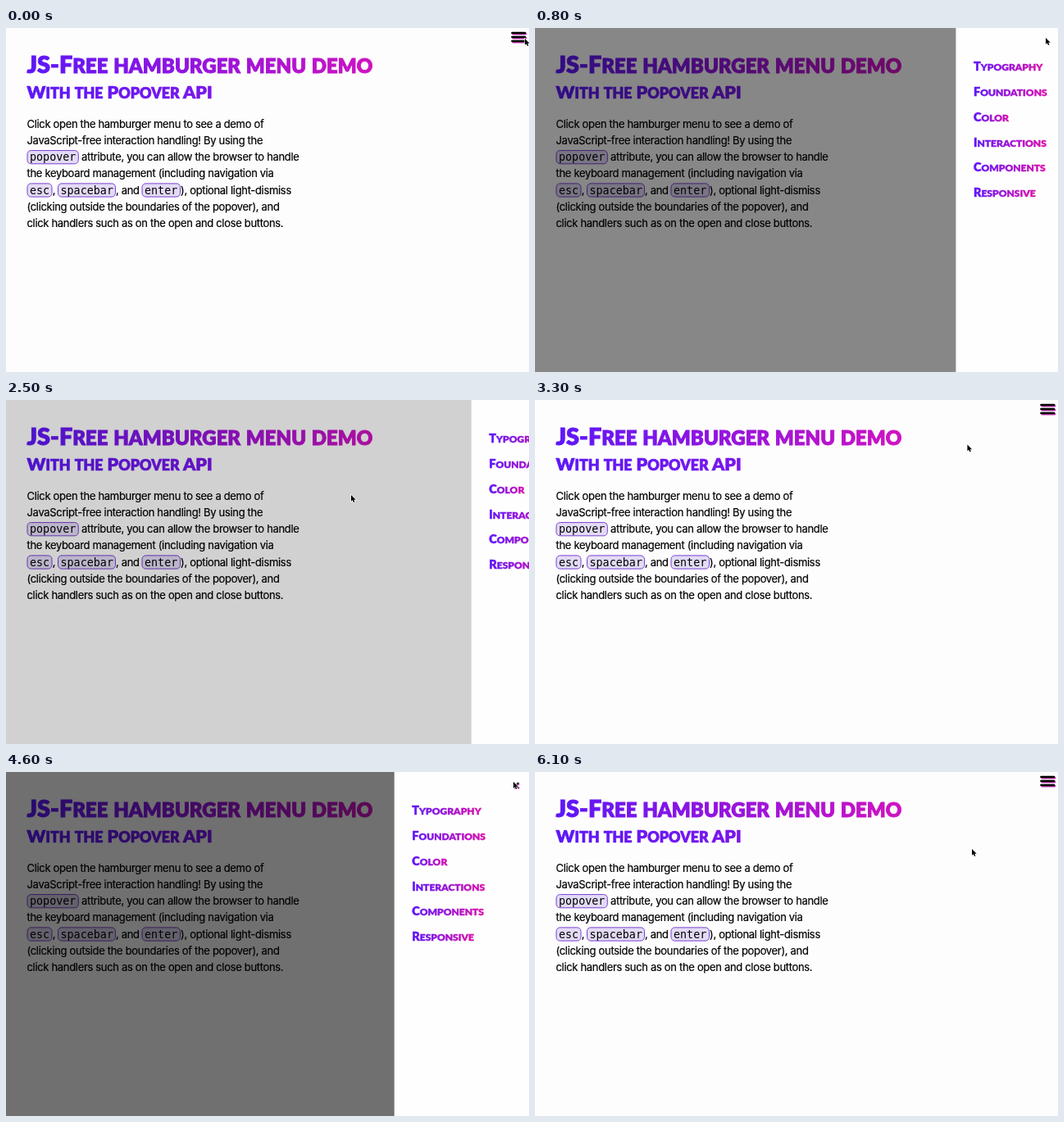
Write an HTML page that moves like this. It is 638x420 px and loops after 6600 ms.

```html
<!DOCTYPE html>
<html lang="en">
<head>
<meta charset="utf-8">
<title>Hamburger menu demo</title>
<style>
  html, body { margin: 0; width: 100%; height: 100%; overflow: hidden; background: #fdfdfd; }
  svg { display: block; width: 638px; height: 420px; }
  text { white-space: pre; }
  .caps { font-family: Lato, sans-serif; font-weight: 900; stroke-width: .03em; }
  .caps .small { font-size: .83em; }
  .body { font: 13px Inter, sans-serif; letter-spacing: -.325px; stroke: #000; stroke-width: .2px; }
  .code { font: 13.4px "DejaVu Sans Mono", monospace; }
  .chip { fill: #e3dbf5; stroke: #7a3fd0; stroke-width: 1; }
</style>
</head>
<body>
<svg id="stage" viewBox="0 0 638 420">
  <defs>
    <linearGradient id="title">
      <stop stop-color="#5c17f8"/><stop offset="1" stop-color="#cf12c2"/>
    </linearGradient>
    <linearGradient id="subtitle">
      <stop stop-color="#5c17f8"/><stop offset="1" stop-color="#7a16ec"/>
    </linearGradient>
    <linearGradient id="link">
      <stop stop-color="#5f16fa"/><stop offset="1" stop-color="#dc0fae"/>
    </linearGradient>
    <path id="bars" d="M617.5 6h15.5M617.5 11h15.5M617.5 16h15.5" stroke-width="2.6" stroke-linecap="round"/>
    <path id="cross" d="M144.4 13l6.4 6.4M150.8 13l-6.4 6.4" stroke-width="1.8"/>
  </defs>
  <g id="page">
    <use href="#bars" stroke="#c92fb4" x="1.1" y="1.1"/>
    <use href="#bars" stroke="#000"/>
  </g>
  <rect id="backdrop" width="638" height="420"/>
  <g id="panel">
    <rect width="167" height="420" fill="#fefefe"/>
    <g transform="translate(.7)">
      <use href="#cross" stroke="#e23bc9" x="1" y="1"/>
      <use href="#cross" stroke="#222"/>
    </g>
  </g>
  <g id="cursor">
    <path id="arrow" d="M0 0V7.8L1.8 6.2 3 9 4.4 8.4 3.2 5.7H5.7Z" stroke="#fff" stroke-width="1.2" paint-order="stroke"/>
    <path id="hand" d="M-.8 7V1Q0-.4.9 1V4Q1.8 3.2 2.6 4.2 3.6 3.5 4.3 4.6 5.6 4.1 5.8 5.5V8L4.7 11H-.2L-3.4 7Q-3.2 5.4-1.8 6.2Z"
      fill="#fff" stroke="#111" stroke-width=".9" stroke-linejoin="round"/>
  </g>
</svg>
<script>
const LOOP = 6600, TICK = 100, SLIDE = 600, WIDTH = 638, PANEL = 165.7, LINE = 20.15;
const $ = id => document.getElementById(id);

function add(parent, tag, attrs, content = '') {
  const node = document.createElementNS('http://www.w3.org/2000/svg', tag);
  for (const key in attrs) node.setAttribute(key, attrs[key]);
  node.textContent = content;
  return parent.appendChild(node);
}

function smallCaps(parent, words, x, y, size, paint) {
  const color = `url(#${paint})`;
  const text = add(parent, 'text', { class: 'caps', x, y, 'font-size': size, fill: color, stroke: color });
  for (const run of words.match(/[a-z]+|[^a-z]+/g))
    add(text, 'tspan', /[a-z]/.test(run) ? { class: 'small' } : {}, run.toUpperCase());
}

const lineY = row => 122 + row * LINE;
const say = (row, x, words) => add($('page'), 'text', { class: 'body', x, y: lineY(row) }, words);

function chip(row, x, width, word) {
  add($('page'), 'rect', { class: 'chip', x, y: lineY(row) - 12.7, width, height: 16.2, rx: 4.5 });
  add($('page'), 'text', { class: 'code', x: x + 3, y: lineY(row) }, word);
}

smallCaps($('page'), 'JS-Free hamburger menu demo', 25.5, 55.2, 28.9, 'title');
smallCaps($('page'), 'With the Popover API', 25.5, 86.3, 21.5, 'subtitle');
say(0, 25.5, 'Click open the hamburger menu to see a demo of');
say(1, 25.5, 'JavaScript-free interaction handling! By using the');
chip(2, 26, 62.3, 'popover');
say(2, 92, 'attribute, you can allow the browser to handle');
say(3, 25.5, 'the keyboard management (including navigation via');
chip(4, 26, 30, 'esc');
say(4, 56.8, ',');
chip(4, 63.5, 70, 'spacebar');
say(4, 134, ', and');
chip(4, 166, 46.5, 'enter');
say(4, 213, '), optional light-dismiss');
say(5, 25.5, '(clicking outside the boundaries of the popover), and');
say(6, 25.5, 'click handlers such as on the open and close buttons.');

['Typography', 'Foundations', 'Color', 'Interactions', 'Components', 'Responsive']
  .forEach((name, i) => smallCaps($('panel'), name, 21.5, 52.3 + i * 30.75, 14.5, 'link'));

// Start times of each opening and closing, in ms
const slides = [[528, 2300], [4073, 5127]];
const fades = [[480, 2260], [4070, 5105]];

// Time, x and y of the pointer tip
const path = [
  [0, 633, 13], [300, 633, 13], [800, 623, 12], [1400, 623, 12], [1500, 590, 25],
  [1600, 533, 64], [1800, 455, 108], [2000, 421, 116], [2800, 421, 116], [3500, 570, 30],
  [3800, 619, 12], [5300, 619, 12], [5700, 575, 22], [6000, 530, 50], [6100, 533, 94], [LOOP, 533, 94]
];

// The CSS "ease" curve: cubic-bezier(.25, .1, .25, 1)
function ease(x) {
  if (x <= 0) return 0;
  if (x >= 1) return 1;
  const bezier = (a, b, u) => 3 * a * u * (1 - u) ** 2 + 3 * b * u * u * (1 - u) + u ** 3;
  let low = 0, high = 1;
  for (let i = 0; i < 24; i++) {
    const mid = (low + high) / 2;
    if (bezier(.25, .25, mid) < x) low = mid; else high = mid;
  }
  return bezier(.1, 1, low);
}

const shown = (visits, t) => visits.reduce(
  (sum, [open, close]) => sum + ease((t - open) / SLIDE) - ease((t - close) / SLIDE), 0);

function pointer(t) {
  const i = path.findIndex(([time]) => time > t);
  const [t0, x0, y0] = path[i - 1], [t1, x1, y1] = path[i];
  const k = (t - t0) / (t1 - t0);
  return [x0 + (x1 - x0) * k, y0 + (y1 - y0) * k];
}

function draw(t) {
  const left = WIDTH - PANEL * shown(slides, t);
  const [x, y] = pointer(t);
  const onLinks = x > left + 21 && x < left + 113 && y > 38 && y < 208;
  $('panel').setAttribute('transform', `translate(${left})`);
  $('backdrop').setAttribute('opacity', .56 * shown(fades, t));
  $('cursor').setAttribute('transform', `translate(${x} ${y})`);
  $('arrow').style.display = onLinks ? 'none' : '';
  $('hand').style.display = onLinks ? '' : 'none';
}

const start = performance.now();
function frame() {
  const t = (performance.now() - start) % LOOP;
  draw(Math.floor(t / TICK) * TICK);
  requestAnimationFrame(frame);
}
frame();
</script>
</body>
</html>
```
